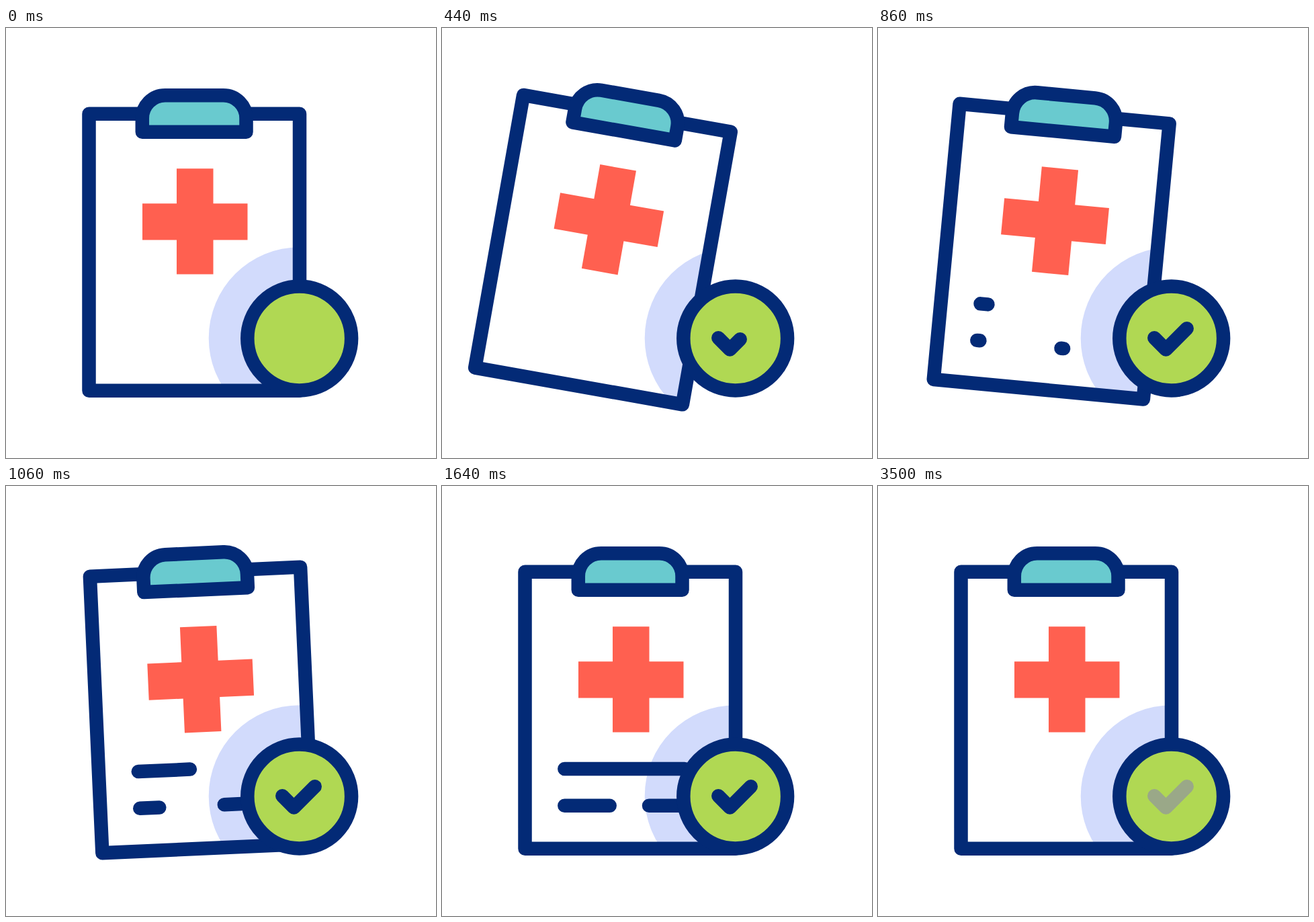
Recreate the animation shown at these times as an HTML page. Size 640 by 640 pixels, loop 3580 ms.

```html
<!DOCTYPE html>
<html lang="en">
<head>
<meta charset="utf-8">
<title>Medical checklist</title>
<style>
  html, body { margin: 0; height: 100%; overflow: hidden; background: #fff; }
  svg { display: block; width: 100%; height: 100%; }
  .ink { fill: none; stroke: #032a76; stroke-width: 20.5; stroke-linecap: round; stroke-linejoin: round; }
</style>
</head>
<body>
<svg viewBox="0 0 640 640">
  <clipPath id="paper"><path d="M123.5 127.7H437V539.7H123.5Z"/></clipPath>
  <g id="board">
    <g clip-path="url(#paper)">
      <circle id="halo" cx="437" cy="461.5" r="135.3" fill="#d2dbfc"/>
    </g>
    <path class="ink" d="M123.5 127.7H437V539.7H123.5Z"/>
    <path class="ink" style="fill:#69cacf" d="M202.8 154.7V134.5A34 34 0 0 1 236.8 100.3H323.5A34 34 0 0 1 357.5 134.5V154.7Z"/>
    <path fill="#ff6050" d="M254 209.3H308.5V261.2H359.5V315.5H308.5V366.5H254V315.5H203V261.2H254Z"/>
    <g id="lines" class="ink">
      <path pathLength="1" d="M182.3 421H361"/>
      <path pathLength="1" d="M182.3 475.8H249.7"/>
      <path pathLength="1" d="M308 475.8H368"/>
    </g>
  </g>
  <circle class="ink" style="fill:#b0d853" cx="436.7" cy="462" r="77.4"/>
  <path id="check" class="ink" pathLength="1" d="M411.3 461.3L428.5 478.5L459.7 447.3"/>
</svg>
<script>
const LOOP = 3580, STEP = 20, LAST = 3500;
const $ = id => document.getElementById(id);
const board = $('board'), halo = $('halo'), lines = $('lines'), check = $('check');
const NAVY = [3, 42, 118], FADED = [154, 168, 136];

const ramp = (t, from, to) => Math.min(1, Math.max(0, (t - from) / (to - from)));
const ease = (t, from, to) => {
  const u = ramp(t, from, to);
  return u * u * (3 - 2 * u);
};

function trim(path, amount) {
  path.style.strokeDasharray = amount + ' 2';
  path.style.visibility = amount > 0 ? 'visible' : 'hidden';
}

function draw(t) {
  // Swing right, a little past the middle, then settle.
  const angle = 13 * ease(t, 160, 565) - 17 * ease(t, 600, 1160) + 4 * ease(t, 1160, 1645);
  board.setAttribute('transform', `rotate(${angle} 280 100)`);
  halo.setAttribute('transform', `rotate(${-angle} 280 100)`);

  for (const line of lines.children) trim(line, ease(t, 760, 1420));
  lines.style.opacity = 1 - ramp(t, 3040, 3240);

  trim(check, ease(t, 160, 615));
  const fade = ramp(t, 3400, LAST);
  check.style.stroke = `rgb(${NAVY.map((c, i) => Math.round(c + (FADED[i] - c) * fade))})`;
}

const start = performance.now();
function tick() {
  const t = (performance.now() - start) % LOOP;
  draw(Math.min(LAST, Math.floor(t / STEP) * STEP));
  requestAnimationFrame(tick);
}
tick();
</script>
</body>
</html>
```
